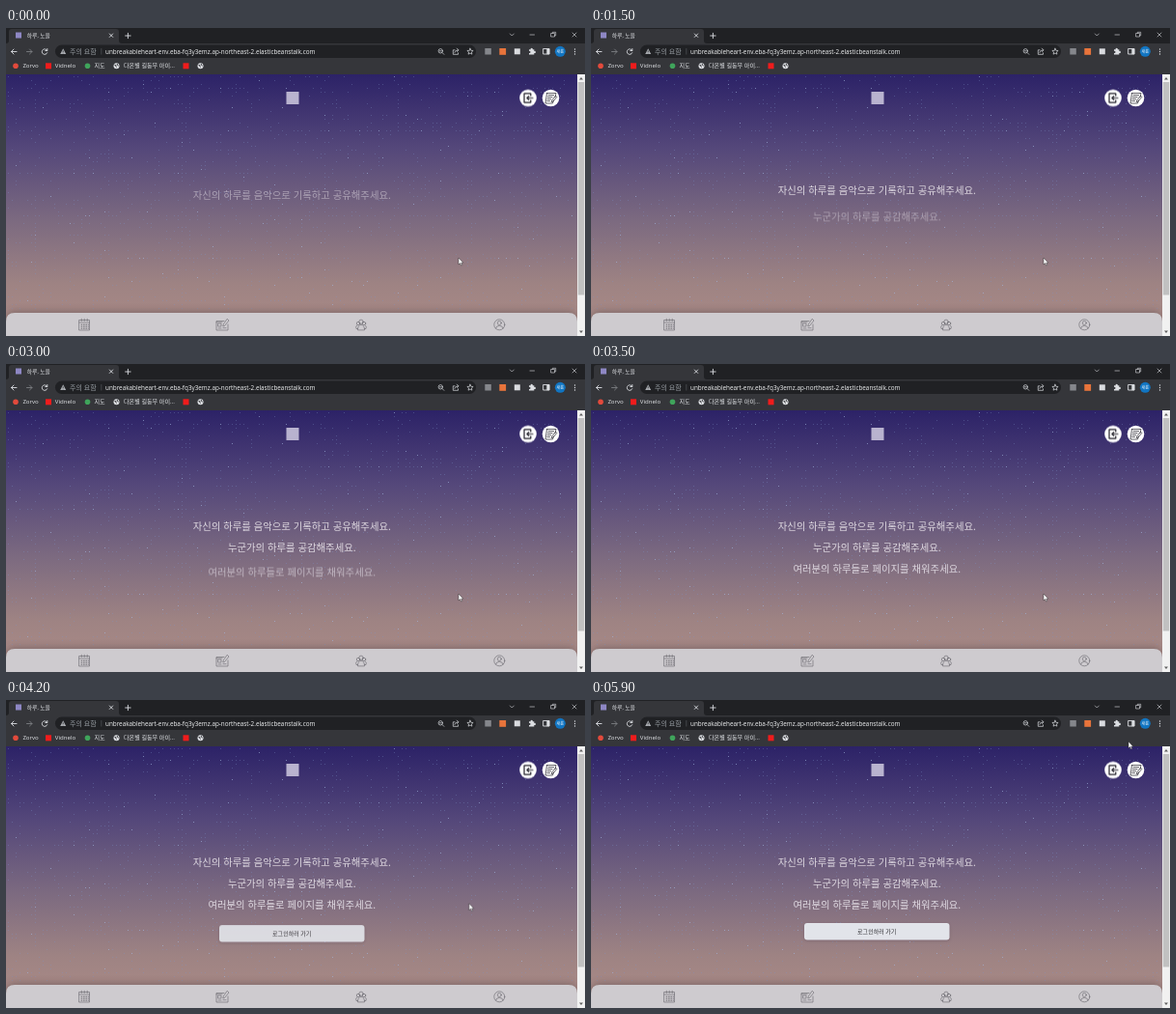
Recreate the animation shown at these times as an HTML page. Size 600 px wide and 319 px high, loop 6000 ms.

```html
<!DOCTYPE html>
<html lang="ko">
<head>
<meta charset="utf-8">
<title>하루, 노을</title>
<style>
  html, body { margin: 0; width: 100%; height: 100%; overflow: hidden; background: #35363a; }
  svg { display: block; width: 600px; height: 319px; }
  text { font-family: 'Open Sans', 'Noto Sans CJK KR', 'Noto Sans CJK', sans-serif; }
  .ui { font-size: 6.1px; fill: #e4e6ea; }
  .line { font-family: 'Noto Sans CJK KR', 'Noto Sans CJK', sans-serif; font-size: 10.36px; font-weight: 300; fill: #dfd9e1; text-anchor: middle; }
  .ico { fill: none; stroke: #dcdee2; stroke-width: .9; stroke-linecap: round; stroke-linejoin: round; }
  .nav { fill: none; stroke: #66646a; stroke-width: .6; stroke-linejoin: round; stroke-linecap: round; }
  .dark { fill: none; stroke: #25232c; stroke-width: 1.2; stroke-linejoin: round; stroke-linecap: round; }
</style>
</head>
<body>
<svg viewBox="0 0 600 319">
  <defs>
    <linearGradient id="sky" x1="0" y1="0" x2="0" y2="1">
      <stop offset="0" stop-color="#2c2267"/>
      <stop offset=".28" stop-color="#54477a"/>
      <stop offset=".56" stop-color="#7c6a80"/>
      <stop offset=".8" stop-color="#9e8383"/>
      <stop offset="1" stop-color="#ac8c87"/>
    </linearGradient>
    <filter id="soft" x="-10%" y="-60%" width="120%" height="220%"><feGaussianBlur stdDeviation="1.6"/></filter>
    <filter id="wide" x="-10%" y="-60%" width="120%" height="220%"><feGaussianBlur stdDeviation="4"/></filter>
    <g id="globe">
      <circle r="3" fill="#dfe1e5"/>
      <path d="M-2.2-1.2L-.3-.6L-.8.6L.2 1.5M.8-2.4L1 -.8L2.3-.1" fill="none" stroke="#35363a" stroke-width=".9"/>
    </g>
    <path id="exit" d="M2.8-2.4V-4.600H-4V4.600H2.800V2.400M5 0H-1M.8-1.900L-1.200 0L.8 1.900"/>
  </defs>

  <!-- page -->
  <rect y="48" width="592" height="271" fill="url(#sky)"/>
  <g id="stars"></g>
  <rect x="290.500" y="66" width="13" height="13" fill="#b9b3cf"/>

  <text class="line" x="296.300" y="171.800">자신의 하루를 음악으로 기록하고 공유해주세요.</text>
  <text class="line" x="296.300" y="193.800">누군가의 하루를 공감해주세요.</text>
  <text class="line" x="296.300" y="215.600">여러분의 하루들로 페이지를 채워주세요.</text>
  <g id="btn">
    <rect x="221" y="232" width="150.500" height="17.500" rx="3" fill="#3a2c40" opacity=".25" filter="url(#soft)"/>
    <rect x="221" y="231" width="150.500" height="17.500" rx="3" fill="#e2e4ea"/>
    <text x="296.200" y="242.200" font-size="6" font-weight="500" text-anchor="middle" fill="#2c2c30">로그인하러 가기</text>
  </g>

  <g transform="translate(541 72.500)">
    <g id="idle">
      <circle r="8.800" fill="#fff"/>
      <use href="#exit" class="dark"/>
    </g>
    <g id="over">
      <circle r="8.500" fill="#4b4388" stroke="#d7d7ee" stroke-width="1"/>
      <circle r="6.700" fill="none" stroke="#a9a8d4" stroke-width=".7"/>
      <use href="#exit" class="dark" style="stroke:#d7d7ee"/>
    </g>
  </g>
  <g transform="translate(564.500 72.500)">
    <circle r="8.800" fill="#fff"/>
    <path class="dark" style="stroke-width:.7" d="M-4-5H5.500L4.500-1M-4-5L-5.500 5.500H2L3 2.500M-2.500-3H3M-3-1H1.500M-3.300 1H0M-3.600 3H-1M5.500-2L6.300-1L2.500 3.500L.8 4.200L1.200 2.600Z"/>
  </g>

  <rect x="0" y="294" width="592" height="28" rx="9" fill="#3a3038" opacity=".4" filter="url(#wide)"/>
  <path d="M0 319V304Q0 295 9 295H583Q592 295 592 304V319Z" fill="#cecbcf"/>
  <g class="nav">
    <path d="M76 302.500H86.500V313H76ZM76 305H86.500M78.300 301.200V303.500M81.200 301.200V303.500M84.200 301.200V303.500"/>
    <path stroke-width=".9" stroke-dasharray=".9 1.500" d="M78 307.200H85.500M78 309.200H85.500M78 311.200H85.500"/>
    <path d="M226 303.500H218V313H230V307M220 306H223V309H220ZM225 310.700H228M220 311H223M229.500 301.500L231 303L226.500 308.500L224.800 309L225.200 307.200ZM218 304.800H224"/>
    <g>
      <circle cx="368" cy="304.300" r="2.200"/><circle cx="365" cy="306" r="1.700"/><circle cx="371" cy="306" r="1.700"/>
      <path d="M364.500 312.500Q364.500 307.500 368 307.500T371.500 312.500ZM363.800 307.800Q361.800 309 363 311.500H364.500M372.200 307.800Q374.200 309 373 311.500H371.500"/>
    </g>
    <g><circle cx="511.300" cy="307.300" r="5.500"/><circle cx="511.300" cy="305.500" r="2"/><path d="M507.500 311Q508 308.300 511.300 308.300T515.100 311"/></g>
  </g>

  <!-- scrollbar -->
  <rect x="592" y="48" width="8" height="271" fill="#f1f1f1"/>
  <rect x="592.800" y="56" width="6.400" height="220.500" fill="#c1c1c1"/>
  <path d="M594 53.500L596 51L598 53.500ZM594 313.500L596 316L598 313.500Z" fill="#606060"/>

  <!-- browser frame -->
  <rect width="600" height="16" fill="#202124"/>
  <rect y="16" width="600" height="32" fill="#35363a"/>
  <path d="M0 16Q3 16 3 13V4Q3 1 6 1H114Q117 1 117 4V13Q117 16 120 16Z" fill="#35363a"/>
  <rect x="10" y="4.500" width="6" height="6" fill="#8e87c4"/>
  <text class="ui" x="21.800" y="10.100" style="font-size:5.75px">하루, 노을</text>
  <g class="ico">
    <path d="M107.300 6L110.700 9.400M110.700 6L107.300 9.400M123.700 8H129.100M126.400 5.300V10.700"/>
    <path style="stroke-width:.6" d="M522.300 6L524.300 8L526.300 6M543 7H547.500M565 5.500H568.500V9H565ZM566.300 5.300V4.300H569.700V7.800H568.700M587 5L591 9M591 5L587 9"/>
    <path d="M11 24.500H5.500M8 22L5.500 24.500L8 27M42.600 23.300A2.800 2.800 0 1 0 42.700 25.700M42.800 21.500V23.500H40.800"/>
    <path d="M21.500 24.500H27M24.500 22L27 24.500L24.500 27" stroke="#7c7e82"/>
  </g>
  <rect x="51" y="17.500" width="436" height="13.500" rx="6.700" fill="#202124"/>
  <path d="M59.200 21.300L62.200 27H56.200Z" fill="#a9acb1"/>
  <path d="M59.200 23.300V25.100M59.200 25.900V26.300" stroke="#202124" stroke-width=".7"/>
  <text x="66" y="26.900" font-size="7" fill="#9aa0a6">주의 요함</text>
  <path d="M98.800 21V27.500" stroke="#5c5f64" stroke-width=".6"/>
  <text x="103" y="26.900" font-size="6.340" fill="#f1f3f4">unbreakableheart-env.eba-fq3y3emz.ap-northeast-2.elasticbeanstalk.com</text>
  <g class="ico" style="stroke-width:.7">
    <circle cx="450.300" cy="23.800" r="2.200"/>
    <path d="M452 25.500L453.800 27.300M449.400 23.800H451.200"/>
    <path d="M465 22.800H463.300V27.300H468.500V25.800M464.800 25.300Q465.300 22.800 468.700 22.800M467.300 21.100L469 22.800L467.300 24.500"/>
    <path id="fav"/>
  </g>
  <rect x="496.300" y="21" width="6.500" height="6.500" fill="#85878c"/>
  <rect x="511.300" y="21" width="6.800" height="6.800" fill="#e8743b"/>
  <rect x="526.800" y="21.300" width="6" height="6" fill="#d9dbdf"/>
  <path d="M542 22.300H543.700A1.100 1.100 0 1 1 545.700 22.300H547.300V23.900A1.100 1.100 0 1 1 547.300 25.900V27.500H542V25.800A1 1 0 1 0 542 24Z" fill="#dcdee2"/>
  <path d="M557 21.500H563V27H557Z" class="ico"/>
  <rect x="560.300" y="21.300" width="2.900" height="5.900" fill="#dcdee2"/>
  <circle cx="574.300" cy="24.300" r="5.500" fill="#1175c2"/>
  <text x="574.300" y="25.800" font-size="4" text-anchor="middle" fill="#fff">새롬</text>
  <g fill="#dcdee2"><circle cx="589.500" cy="22" r=".7"/><circle cx="589.500" cy="24.500" r=".7"/><circle cx="589.500" cy="27" r=".7"/></g>

  <circle cx="10" cy="39.300" r="2.800" fill="#e24a3c"/>
  <text class="ui" x="17.400" y="41.300">Zorvo</text>
  <rect x="41" y="36.300" width="6" height="6" fill="#f01c1c"/>
  <text class="ui" x="50.800" y="41.300">Vidnelo</text>
  <circle cx="84.500" cy="39.300" r="2.800" fill="#3fa45b"/>
  <text class="ui" x="91.500" y="41.300">지도</text>
  <use href="#globe" x="114.500" y="39.300"/>
  <text class="ui" x="122" y="41.300">다온별 길동무 아이...</text>
  <rect x="183.500" y="36.300" width="6" height="6" fill="#f01c1c"/>
  <use href="#globe" x="201.500" y="39.300"/>

  <path id="cursor" d="M0 0V7L1.600 5.600L2.700 8L3.800 7.500L2.700 5.200H4.800Z" fill="#fff" stroke="#222" stroke-width=".45"/>
</svg>
<script>
const LOOP = 6000;
const $ = s => document.querySelector(s);

// seeded stars, denser along a few rows and columns
let seed = 17;
const rnd = () => (seed = (seed * 16807) % 2147483647) / 2147483647;
const near = (v, step, at) => Math.abs((v % step) - at) < 3;
let dim = '', lit = '';
for (let y = 50; y < 293; y += 4) {
  for (let x = 2; x < 590; x += 4) {
    const odds = near(x, 75, 30) || near(y, 44, 18) ? .4 : .12;
    if (rnd() > odds) continue;
    const dot = `M${x} ${y}h1v1h-1z`;
    if (rnd() < .07) lit += dot; else dim += dot;
  }
}
$('#stars').innerHTML =
  `<path d="${dim}" fill="#7c93c8" opacity=".34"/><path d="${lit}" fill="#a3b9e2" opacity=".6"/>`;

// bookmark star
const tips = Array.from({ length: 10 }, (_, i) => {
  const r = i % 2 ? 1.5 : 3.3, a = i * Math.PI / 5;
  return `${(481 + r * Math.sin(a)).toFixed(2)} ${(24.5 - r * Math.cos(a)).toFixed(2)}`;
});
$('#fav').setAttribute('d', `M${tips.join('L')}Z`);

// each row: [time in ms, style, easing to the next row]
function play(el, rows) {
  const last = rows[rows.length - 1];
  if (rows[0][0] > 0) rows.unshift([0, rows[0][1]]);
  if (last[0] < LOOP) rows.push([LOOP, last[1]]);
  el.animate(rows.map(([t, style, easing = 'linear']) => ({ ...style, offset: t / LOOP, easing })),
    { duration: LOOP, iterations: Infinity });
}
const rise = (dy, opacity) => ({ transform: `translate(0px, ${dy}px)`, opacity });
const at = (x, y) => ({ transform: `translate(${x}px, ${y}px)` });
const show = opacity => ({ opacity });

const [one, two, three] = document.querySelectorAll('.line');
play(one, [[0, rise(5, .55), 'ease-out'], [700, rise(0, 1)]]);
play(two, [[1200, rise(11, 0), 'ease'], [2200, rise(0, 1)]]);
play(three, [[2600, rise(11, 0), 'ease'], [3600, rise(0, 1)]]);
play($('#btn'), [[3550, rise(25, 0), 'ease'], [4550, rise(0, 1)]]);

play($('#cursor'), [
  [4050, at(469, 238), 'ease-in'], [4300, at(494, 175)], [4500, at(535, 86)],
  [4650, at(543, 73)], [4800, at(554.5, 56.5)], [5000, at(558, 46), 'ease-out'], [5200, at(557, 43)]
]);
play($('#over'), [[4480, show(0)], [4520, show(1)], [4840, show(1)], [4900, show(0)]]);
play($('#idle'), [[4480, show(1)], [4520, show(0)], [4840, show(0)], [4900, show(1)]]);
</script>
</body>
</html>
```
